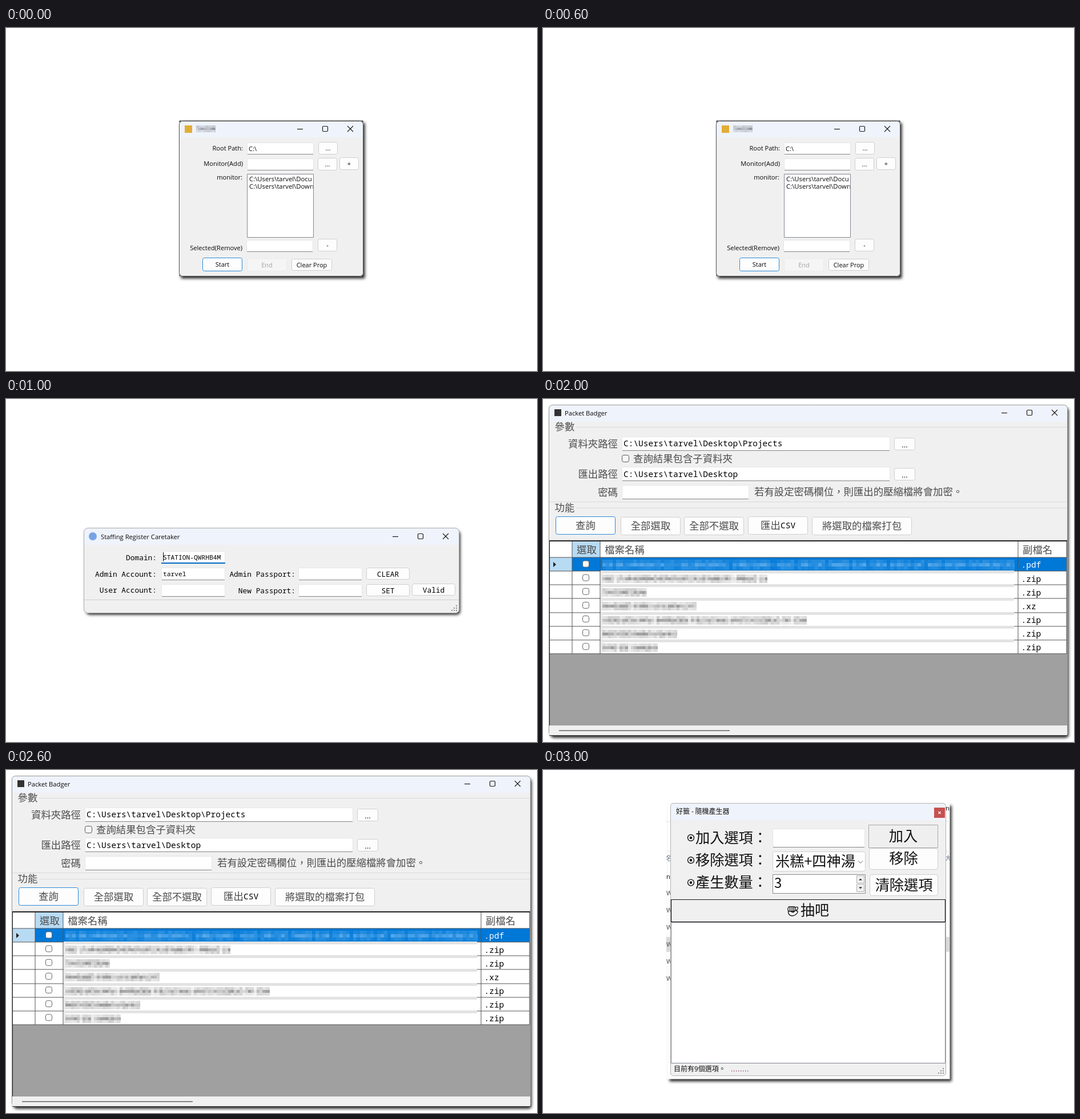
Animation of 930 by 602 pixels, one loop 4 s. Source, as an HTML page with a canvas:

```html
<!DOCTYPE html>
<html lang="zh-Hant">
<head>
<meta charset="utf-8">
<title>Tool windows</title>
<style>
html, body { margin: 0; width: 100%; height: 100%; overflow: hidden; background: #fff; }
canvas { display: block; width: 930px; height: 602px; }
</style>
</head>
<body>
<canvas id="stage" width="930" height="602"></canvas>
<script>
const ctx = document.getElementById('stage').getContext('2d');
const CJK_FAMILY = '"Noto Sans CJK TC", "Noto Sans CJK", "Noto Sans CJK JP", sans-serif';
const SANS = { weight: 400, family: '"Open Sans", "Noto Sans", sans-serif', color: '#0a0a0a' };
const MONO = { weight: 500, family: '"Noto Sans Mono", "DejaVu Sans Mono", monospace', color: '#000' };
const CJK = { weight: 400, family: CJK_FAMILY, color: '#111' };
const THIN = { weight: 300, family: CJK_FAMILY, color: '#4c4c4c' };
const FACE = '#f0f0f0', BAR = '#eff3fb', BLUE = '#2b8ad8', INK = '#1a1a1a';

// y is the visual middle of the line
function text(str, x, y, size, font, align = 'left', color = font.color) {
  ctx.font = `${font.weight} ${size}px ${font.family}`;
  ctx.textAlign = align;
  ctx.fillStyle = color;
  ctx.fillText(str, x, y + size * 0.37);
}

function rect(x, y, x2, y2, color) {
  ctx.fillStyle = color;
  ctx.fillRect(x, y, x2 - x, y2 - y);
}

function box(x, y, x2, y2, r, fill, stroke, width = 1) {
  ctx.beginPath();
  ctx.roundRect(x + 0.5, y + 0.5, x2 - x - 1, y2 - y - 1, r);
  if (fill) { ctx.fillStyle = fill; ctx.fill(); }
  if (stroke) { ctx.strokeStyle = stroke; ctx.lineWidth = width; ctx.stroke(); }
}

function line(points, color, width = 1) {
  ctx.beginPath();
  points.forEach(([x, y]) => ctx.lineTo(x, y));
  ctx.strokeStyle = color;
  ctx.lineWidth = width;
  ctx.stroke();
}

function clipped(x, y, x2, y2, r, paint) {
  ctx.save();
  ctx.beginPath();
  ctx.roundRect(x, y, x2 - x, y2 - y, r);
  ctx.clip();
  paint();
  ctx.restore();
}

function shadow(x, y, x2, y2, r, fill) {
  ctx.save();
  ctx.shadowColor = 'rgba(0,0,0,.85)';
  ctx.shadowBlur = 5;
  ctx.shadowOffsetX = 3;
  ctx.shadowOffsetY = 4;
  box(x, y, x2, y2, r, fill);
  ctx.restore();
}

function panel(x, y, x2, y2, r, barBottom, edge) {
  clipped(x, y, x2, y2, r, () => {
    rect(x, y, x2, y2, FACE);
    rect(x, y, x2, barBottom, BAR);
  });
  box(x, y, x2, y2, r, null, edge);
}

function controls(x, y) {
  line([[x - 5, y + 0.5], [x + 5, y + 0.5]], INK, 1.2);
  box(x + 39, y - 5, x + 49, y + 5, 1.5, null, INK, 1.2);
  line([[x + 83, y - 5], [x + 93, y + 5]], INK, 1.1);
  line([[x + 93, y - 5], [x + 83, y + 5]], INK, 1.1);
}

function field(x, y, x2, y2) {
  box(x, y, x2, y2, 2, '#fff', '#e6e6e6');
  rect(x + 1, y2 - 1, x2 - 1, y2, '#868686');
}

function button(label, x, y, x2, y2, size, font, style = {}) {
  box(x, y, x2, y2, style.r ?? 3, style.fill || '#fdfdfd', style.edge || '#cfcfcf');
  text(label, (x + x2) / 2, (y + y2) / 2 + (style.dy || 0), size, font, 'center', style.color);
}

function grip(x, y) {
  for (let row = 0; row < 3; row++)
    for (let col = 2 - row; col < 3; col++)
      rect(x + col * 4, y + row * 4, x + col * 4 + 2, y + row * 4 + 2, '#8c8c8c');
}

function random(seed) {
  return () => (seed = (seed * 16807) % 2147483647) / 2147483647;
}

function mosaic(x, y, x2, rows, cell, seed, tint) {
  const rnd = random(seed * 7919 + 13);
  for (let cx = x; cx < x2; cx += cell) {
    const gap = rnd() < 0.08 ? 0.4 : 1;
    for (let r = 0; r < rows; r++) {
      const edge = r === 0 || r === rows - 1 ? 0.5 : 1;
      const a = (0.22 + rnd() * 0.32) * gap * edge;
      rect(cx, y + r * cell, Math.min(cx + cell, x2), y + (r + 1) * cell, `rgba(${tint},${a})`);
    }
  }
}

function monitorWindow() {
  shadow(303, 162, 626, 436, 1, '#222');
  panel(303, 163, 626, 436, 6, 192, '#555');
  rect(313, 171, 326, 184, '#e3ad35');
  mosaic(333, 171, 367, 3, 4, 5, '70,75,85');
  controls(515, 177);

  const label = (s, y, x = 415) => text(s, x, y, 11.1, SANS, 'right');
  label('Root Path:', 211);
  label('Monitor(Add)', 238);
  label('monitor:', 262, 414);
  label('Selected(Remove)', 386, 414);

  field(422, 201, 539, 222);
  text('C:\\', 425, 211.5, 11.1, SANS);
  field(422, 229, 539, 250);
  field(421, 372, 538, 393);
  box(422, 256, 539, 368, 0, '#fff', '#828790');
  clipped(423, 257, 537.5, 367, 0, () => {
    text('C:\\Users\\tarvel\\Docu', 426, 264.5, 11.3, SANS);
    text('C:\\Users\\tarvel\\Downloads', 426, 278, 11.3, SANS);
  });

  const btn = (s, x, y, x2, y2, style) => button(s, x, y, x2, y2, 11, SANS, style);
  btn('...', 547, 200, 581, 222);
  btn('...', 546, 228, 580, 250);
  btn('+', 584, 227, 618, 249);
  btn('-', 546, 370, 580, 392);
  btn('Start', 344, 403, 414, 427, { edge: BLUE, dy: -0.5 });
  btn('End', 422, 404, 492, 427, { fill: '#f5f5f5', edge: '#eaeaea', color: '#a3a3a3' });
  btn('Clear Prop', 500, 405, 571, 426);
}

function accountWindow() {
  shadow(137, 227, 793, 375, 6, FACE);
  panel(136, 226, 794, 376, 7, 256, '#a9a9a9');
  ctx.beginPath();
  ctx.arc(152, 241, 7, 0, 7);
  ctx.fillStyle = '#78a3e6';
  ctx.fill();
  text('Staffing Register Caretaker', 166, 241.5, 11.2, SANS);
  controls(682, 241);
  rect(137, 352, 793, 353, '#d0d0d0');
  grip(780, 362);

  const label = (s, x, y) => text(s, x, y, 12.85, MONO, 'right');
  label('Domain:', 264, 278);
  label('Admin Account:', 264, 307);
  label('User Account:', 264, 335.5);
  label('Admin Passport:', 507, 307);
  label('New Passport:', 507, 336);

  field(272, 267, 384, 289);
  rect(272, 287, 384, 289, '#0067c0');
  text('STATION-QWRHB4M', 275, 277.5, 11.25, MONO);
  rect(275, 269, 276, 285, '#000');
  field(272, 296, 384, 318);
  text('tarvel', 275, 306.5, 11.25, MONO);
  field(272, 325, 384, 347);
  field(512, 296, 624, 318);
  field(512, 325, 624, 347);

  button('CLEAR', 631, 296, 707, 317, 12.85, MONO, { dy: 0.5 });
  button('SET', 631, 325, 707, 346, 12.85, MONO, { dy: 0.5 });
  button('Valid', 711, 324, 787, 345, 12.85, MONO, { dy: 0.5 });
}

function fileWindow() {
  shadow(10, 11, 918, 591, 5, FACE);
  panel(10, 10, 919, 591, 6, 40, '#9a9a9a');
  rect(20, 18, 32, 30, '#333');
  text('Packet Badger', 38, 25, 11.2, SANS);
  controls(808, 24);

  const SIZE = 17.4, CODE = 14.5;
  const zh = (s, x, y, align) => text(s, x, y, SIZE, THIN, align);
  const rule = (x, y) => rect(x, y, 918, y + 1, '#dadada');
  rule(58, 49);
  rule(11, 180);
  rule(58, 191);
  rule(11, 246);
  zh('參數', 20.5, 49);
  zh('功能', 20.5, 191);
  zh('資料夾路徑', 131, 79, 'right');
  zh('查詢結果包含子資料夾', 158, 105);
  zh('匯出路徑', 131, 132, 'right');
  zh('密碼', 131, 163.5, 'right');
  zh('若有設定密碼欄位，則匯出的壓縮檔將會加密。', 370, 163);

  field(138, 66, 608, 91);
  field(138, 119, 608, 144);
  field(138, 151, 361, 176);
  text('C:\\Users\\tarvel\\Desktop\\Projects', 141, 78, CODE, MONO);
  text('C:\\Users\\tarvel\\Desktop', 141, 131.5, CODE, MONO);
  box(138, 98, 151, 111, 3, '#f8f8f8', '#555');
  button('...', 615, 68, 652, 90, 13, SANS, { dy: 1.5 });
  button('...', 615, 121, 652, 143, 13, SANS, { dy: 1.5 });

  const btn = (s, x, y, x2, style) => button(s, x, y, x2, y + 32, SIZE, THIN, style);
  btn('查詢', 22, 206, 127, { edge: BLUE });
  btn('全部選取', 136, 207, 241);
  btn('全部不選取', 247, 207, 352);
  btn('', 359, 206, 464);
  zh('匯出', 381, 222);
  text('CSV', 416, 222, CODE, MONO);
  btn('將選取的檔案打包', 471, 207, 646);

  grid(SIZE, CODE);
  rect(11, 573, 918, 590, FACE);
  rect(28, 581, 327, 583, '#858585');
  rect(11, 590, 918, 591, '#333');
}

function grid(size, code) {
  const TOP = 278, STEP = 24.15;
  const ends = [826, 393, 182, 269, 462, 235, 201];
  const rowY = i => Math.round(TOP + i * STEP);
  const bottom = rowY(ends.length);

  rect(11, 248, 918, 573, '#a0a0a0');
  rect(12, 250, 917, bottom, '#fff');
  rect(51, 250, 100, TOP, '#b8dbf4');
  rect(12, TOP, 51, rowY(1), '#b8dbf4');
  rect(51, TOP, 917, rowY(1), '#0078d7');
  for (let i = 0; i <= ends.length; i++) rect(12, rowY(i) - 0.5, 917, rowY(i) + 0.5, '#555');
  for (const x of [51, 100, 832, 917]) rect(x - 0.5, 250, x + 0.5, bottom, '#555');
  rect(11, 248, 918, 250, '#222');
  rect(11, 248, 12, 573, '#222');

  text('選取', 59, 265, size, THIN);
  text('檔案名稱', 108, 265, size, THIN);
  text('副檔名', 840, 265, size, THIN);
  ctx.beginPath();
  ctx.moveTo(18, 286);
  ctx.lineTo(23, 290.5);
  ctx.lineTo(18, 295);
  ctx.fillStyle = '#222';
  ctx.fill();

  ends.forEach((end, i) => {
    const y = rowY(i), mid = TOP + i * STEP + 12.5;
    box(69, mid - 7, 81, mid + 5, 3, '#fbfbfb', '#666');
    if (i) {
      rect(101, y - 1, 825, y + 4, '#e3e3e3');
      rect(101, y, 104, y + 22, '#e8e8e8');
    }
    mosaic(104, y + (i ? 6 : 4), end, 3, i ? 5 : 6, i + 3, i ? '70,70,70' : '160,210,250');
    const ext = i === 0 ? '.pdf' : i === 3 ? '.xz' : '.zip';
    text(ext, 837.5, mid + 0.5, code, MONO, 'left', i ? '#000' : '#fff');
  });
}

function fist(x, y) {
  ctx.save();
  ctx.translate(x, y);
  ctx.lineJoin = 'round';
  ctx.beginPath();
  ctx.roundRect(1, 2, 13, 8, 3);
  ctx.moveTo(1.5, 9);
  ctx.quadraticCurveTo(1, 17, 8, 18);
  ctx.quadraticCurveTo(14, 18, 18, 12);
  ctx.moveTo(14, 3);
  ctx.quadraticCurveTo(20, 1, 18, 6);
  ctx.lineTo(15, 9);
  ctx.quadraticCurveTo(19, 9, 18, 12);
  for (const fx of [4.5, 8, 11]) {
    ctx.moveTo(fx, 3);
    ctx.lineTo(fx, 10);
  }
  ctx.moveTo(6, 10);
  ctx.quadraticCurveTo(11, 14, 13, 9);
  ctx.strokeStyle = '#111';
  ctx.lineWidth = 1.3;
  ctx.stroke();
  ctx.restore();
}

function drawWindow() {
  shadow(217, 57, 713, 543, 0, '#fdfdfd');
  rect(216, 90, 713, 91, '#e4e4e4');
  rect(216, 142, 713, 143, '#e4e4e4');
  rect(216, 293, 712, 319, '#d9d9d9');
  clipped(216, 58, 713, 540, 0, () => {
    text('名', 215, 155, 11, CJK, 'left', '#6d7a90');
    text('大', 704, 155, 11, CJK, 'left', '#6d7a90');
    text('nc', 216, 187, 11, SANS);
    text('n', 705, 67, 11, SANS);
    for (let i = 0; i < 6; i++) text('W', 216, 216 + i * 30, 11, SANS, 'left', '#444');
  });
  panel(223, 58, 706, 537, 5, 88, '#b5b5b5');

  text('好籤 - 隨機產生器', 233, 73, 12, CJK);
  rect(685, 66, 704, 84, '#c75050');
  line([[692.5, 73], [696.5, 77]], '#fff', 1.3);
  line([[696.5, 73], [692.5, 77]], '#fff', 1.3);

  const SIZE = 25.2;
  ['加入選項：', '移除選項：', '產生數量：'].forEach((s, i) => {
    const y = 118.5 + i * 39.3;
    ctx.beginPath();
    ctx.arc(259, y + 0.5, 5.5, 0, 7);
    ctx.strokeStyle = '#111';
    ctx.lineWidth = 1.4;
    ctx.stroke();
    rect(257, y - 1.5, 261, y + 2.5, '#111');
    text(s, 267, y, SIZE, CJK);
  });

  field(402, 103, 564, 136);
  box(402, 143, 565, 178, 3, '#fdfdfd', '#cfcfcf');
  text('米糕+四神湯', 407, 160, SIZE, CJK);
  line([[552, 159.5], [556, 163.5], [560, 159.5]], '#666');
  box(402, 183, 565, 217, 0, '#fff', '#8a8a8a');
  text('3', 405, 198, 24, CJK);
  for (const [y, dir] of [[185, -1], [200, 1]]) {
    box(549, y, 563, y + 14, 0, FACE, '#b0b0b0');
    ctx.beginPath();
    ctx.moveTo(553, y + 7 - dir * 1.5);
    ctx.lineTo(559, y + 7 - dir * 1.5);
    ctx.lineTo(556, y + 7 + dir * 1.5);
    ctx.fillStyle = '#222';
    ctx.fill();
  }

  button('加入', 570, 96, 692, 137, SIZE, CJK, { r: 0, fill: '#efefef', edge: '#a8a8a8', dy: -1 });
  button('移除', 571, 137, 692, 175, SIZE, CJK, { r: 4, dy: -1 });
  button('清除選項', 572, 183, 692, 221, SIZE, CJK, { r: 4, dy: -0.5 });

  box(224, 227, 705, 267, 0, FACE, '#111', 1.2);
  fist(428, 238);
  text('抽吧', 451, 246, 25, CJK);
  box(224, 267, 705, 515, 0, '#fff', '#828790');
  text('目前有9個選項。', 229, 524.5, 12, CJK);
  for (let i = 0; i < 8; i++) rect(330 + i * 4, 527.5, 331.3 + i * 4, 529, '#8a3a62');
  grip(692, 523);
}

const scenes = [monitorWindow, accountWindow, fileWindow, drawWindow];
const start = performance.now();
let shown = -1;

function tick() {
  const t = Math.max(0, performance.now() - start) % 4000;
  const next = Math.floor(t / 1000);
  if (next !== shown) {
    shown = next;
    rect(0, 0, 930, 602, '#fff');
    scenes[next]();
  }
  requestAnimationFrame(tick);
}
tick();
</script>
</body>
</html>
```
